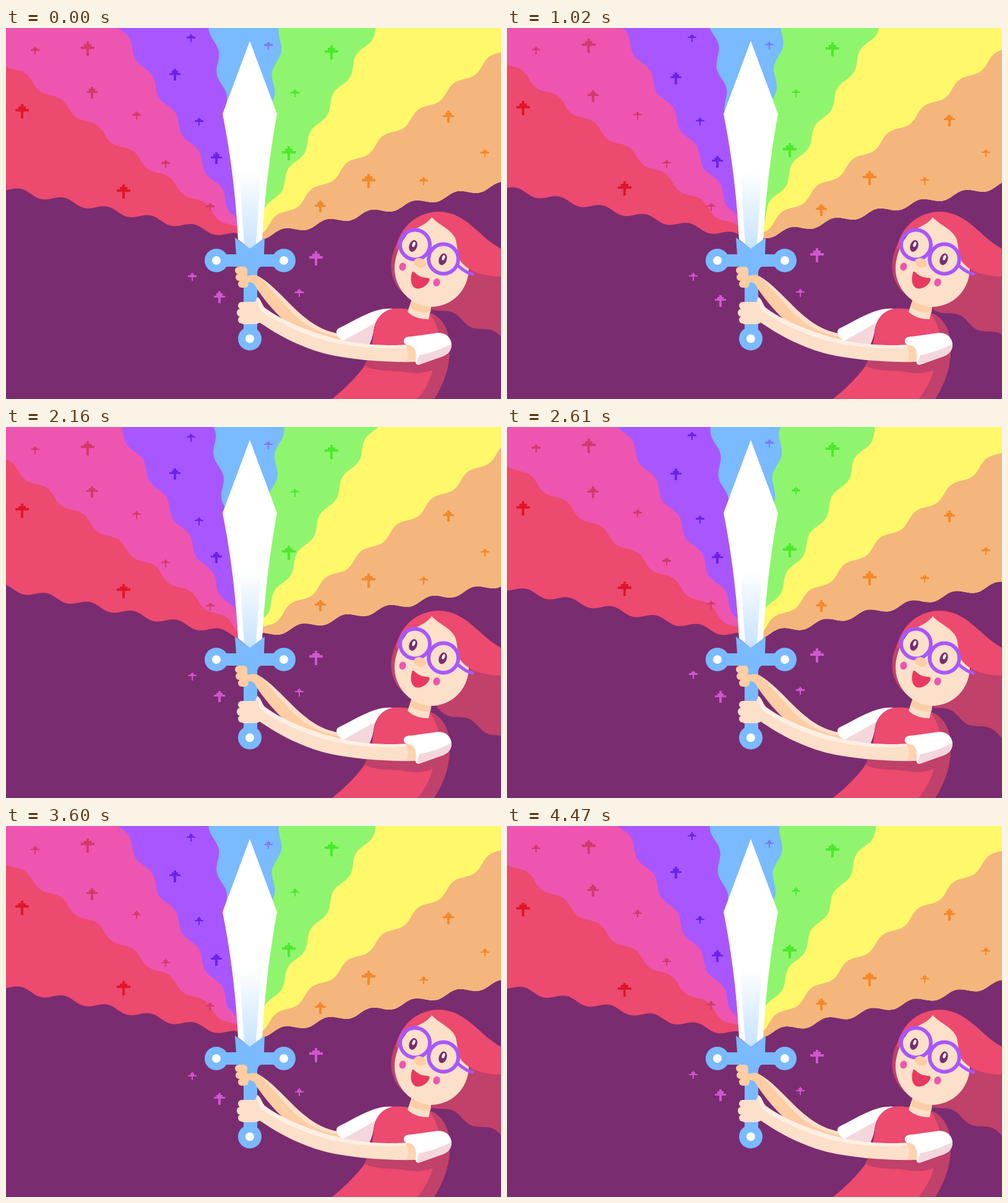
These frames come from a looping animation (800 px wide and 600 px high, 4.5 s). An HTML page:

```html
<!DOCTYPE html>
<html lang="en">
<head>
<meta charset="utf-8">
<title>Rainbow sword</title>
<style>
  html, body { margin: 0; width: 100%; height: 100%; overflow: hidden; background: #7a2c70; }
  svg { display: block; width: 800px; height: 600px; }
</style>
</head>
<body>
<svg viewBox="0 0 800 600" xmlns="http://www.w3.org/2000/svg">
  <defs>
    <linearGradient id="shine" x1="0" y1="232" x2="0" y2="356" gradientUnits="userSpaceOnUse">
      <stop offset="0" stop-color="#fff"/>
      <stop offset="1" stop-color="#c6e3ff"/>
    </linearGradient>
  </defs>
  <rect width="800" height="600" fill="#7a2c70"/>
  <g id="rays"></g>
  <g id="stars" shape-rendering="crispEdges"></g>

  <!-- hair behind -->
  <path id="tail" fill="#c0416a"/>
  <path d="M640 338C624 354 618 385 626 405C630 418 640 428 646 432L660 380Z" fill="#c0416a"/>

  <!-- dress -->
  <path d="M622 454C606 456 597 470 594 494C592 512 588 530 579 547C567 564 548 583 527 600H692C708 574 717 548 717 520C718 490 706 470 688 462C665 456 642 452 622 454Z" fill="#ec4a6e"/>
  <path d="M685 462C709 470 718 492 717 524C716 552 707 576 692 600H665C677 586 685 570 690 553C674 559 662 559 648 557C626 552 602 558 579 546L586 532L660 536L702 505C699 488 694 474 685 462Z" fill="#c0416a"/>

  <!-- neck and face -->
  <path d="M656 438L649 459C658 468 671 471 683 471L688 448Z" fill="#fce0c9"/>
  <path d="M656 438L653 452C664 459 675 461 686 460L688 446Z" fill="#fdcda4"/>
  <path d="M688 304C656 318 632 346 628 384C626 420 653 449 686 451C721 451 747 424 748 390C748 342 722 306 688 304Z" fill="#fce0c9"/>
  <path d="M630 356C638 318 668 297 700 297C731 298 750 317 771 336C781 345 791 352 800 357V402C772 402 746 394 734 376C729 367 730 350 726 340C719 325 700 319 688 306C678 321 652 326 642 338C638 344 636 350 633 358Z" fill="#ec4a6e"/>

  <ellipse cx="658" cy="352.500" rx="6.3" ry="9.700" transform="rotate(20 658 352.500)" fill="#7a2c70"/>
  <ellipse cx="659" cy="350" rx="2.3" ry="4.3" transform="rotate(20 659 350)" fill="#fff"/>
  <ellipse cx="706" cy="374" rx="6.3" ry="9.700" transform="rotate(20 706 374)" fill="#7a2c70"/>
  <ellipse cx="707" cy="371.500" rx="2.3" ry="4.3" transform="rotate(20 707 371.500)" fill="#fff"/>
  <g fill="none" stroke="#a857fe" stroke-width="6">
    <path d="M730 384C738 391 746 397 754 398" stroke-linecap="round" stroke-width="5"/>
    <circle cx="661" cy="350.500" r="24"/>
    <circle cx="707" cy="373.500" r="24"/>
  </g>
  <ellipse cx="669" cy="380" rx="10" ry="7.500" transform="rotate(22 669 380)" fill="#fdcda4"/>
  <ellipse cx="641" cy="386" rx="5.500" ry="6.500" transform="rotate(20 641 386)" fill="#ed55b0"/>
  <ellipse cx="696" cy="411.500" rx="5.500" ry="6.500" transform="rotate(20 696 411.500)" fill="#ed55b0"/>
  <path d="M656 396C656 394 658 393 660 395C667 402 674 404 682 404C685 405 685 407 684 409C680 418 670 423 662 421C654 417 653 406 656 396Z" fill="#e8395f"/>

  <!-- sword -->
  <path d="M394 21L438 139C428 194 418 265 414 345L394 357L375 342C371 262 361 194 350 139Z" fill="#fff"/>
  <path d="M377 232H412L404 350L394 357L385 350Z" fill="url(#shine)"/>
  <g fill="#7abaff">
    <path d="M370 339L394 357L418 339L417 366H449V386H412Q406 388 406 398V492H384V398Q384 389 376 386H340V366H372Z"/>
    <circle cx="340" cy="376" r="19"/>
    <circle cx="449" cy="376" r="19"/>
    <circle cx="394" cy="502.500" r="19"/>
  </g>
  <g fill="#fff">
    <circle cx="340" cy="376" r="7"/>
    <circle cx="449" cy="376" r="7"/>
    <circle cx="394" cy="502.500" r="7"/>
  </g>

  <!-- far arm -->
  <path d="M388 402C396 399 402 399 407 401C436 418 455 446 484 469C502 484 522 493 546 496L551 508C514 507 481 498 455 478C434 460 418 440 405 421C401 412 396 410 390 412Z" fill="#fdcda4"/>
  <path d="M407 401C436 418 455 446 484 469C502 484 522 493 546 496L545 500C518 497 497 489 478 474C450 452 432 423 407 401Z" fill="#fce0c9"/>
  <g fill="#fdcda4">
    <rect x="370" y="386" width="20" height="12" rx="6"/>
    <rect x="371" y="397" width="20" height="12" rx="6"/>
    <rect x="375" y="408" width="17" height="12" rx="6"/>
    <path d="M378 386H386Q390 388 390 400L391 416L380 418Z"/>
  </g>
  <path d="M625 454C596 451 566 472 537 486C530 491 536 504 550 508L586 514C591 505 593 497 594 489C597 472 606 458 625 454Z" fill="#fff"/>
  <path d="M596 477C580 487 562 496 545 506L550 508L586 514C591 505 593 497 594 489Z" fill="#f3d7dc"/>

  <!-- near arm -->
  <path d="M406 435C413 439 413 449 420 454C452 477 500 495 548 506C588 514 625 514 652 512L668 524L664 540C612 541 560 537 517 527C475 516 440 497 408 475L396 460Z" fill="#fce0c9"/>
  <path d="M406 435C413 439 413 449 420 454C452 477 500 495 548 506C588 514 625 514 652 512L654 516C610 520 572 517 536 510C488 500 446 480 414 459C408 454 408 446 406 435Z" fill="#ffefe4"/>
  <path d="M645 512H662L668 526L664 540H647C651 530 650 521 645 512Z" fill="#fdd3b0"/>
  <g fill="#fce0c9">
    <path d="M380 443H402Q408 443 410 454L411 476Q407 479 400 479H382Z"/>
    <rect x="375" y="443" width="24" height="12" rx="6"/>
    <rect x="373" y="454" width="24" height="13" rx="6"/>
    <rect x="375" y="466" width="24" height="12" rx="6"/>
  </g>
  <path d="M643 508C642 501 648 499 655 499L698 493C713 492 721 504 720 514C719 525 711 530 700 533L669 544C664 546 661 543 662 538C664 525 661 517 655 514C650 512 644 513 643 508Z" fill="#fff"/>
  <path d="M720 511C720 524 712 529 700 533L669 544C665 545 664 542 665 538L668 529C686 526 704 519 720 511Z" fill="#f3d7dc"/>
</svg>

<script>
const NS = "http://www.w3.org/2000/svg";
const TAU = Math.PI * 2;
const LOOP = 4500, STEP = 30;
const WAVE_MS = 900, BOB_MS = 2250;
const LENGTH = 71.5, AMP = 4.9;

const angles = [168.4, 144.2, 121.7, 100.3, 81.35, 59.15, 36.7, 12.1];
const colors = ["#ec4a6e", "#ed55b0", "#a857fe", "#7abaff", "#8ff56f", "#fff86a", "#f4b67c"];

// unit size, bob height, time of lowest point, rest offset from the listed y
const kinds = {
  big: { unit: 3.8, amp: 3.2, low: 0.87, dy: -2.2 },
  mid: { unit: 3.1, amp: 3, low: 0.52, dy: 3 },
  small: { unit: 2.2, amp: 2.7, low: 0.73, dy: 0.5 }
};
const red = "#e0162b", rose = "#d23a6c", violet = "#6c22ea", lime = "#4cea2b";
const amber = "#f4882a", orchid = "#cf56cf";
const stars = [
  ["big", 132, 33, rose], ["big", 26, 134, red], ["big", 190, 264, red],
  ["big", 526, 39, lime], ["big", 457, 202, lime], ["big", 586, 247, amber],
  ["big", 501, 372, orchid],
  ["mid", 139, 104, rose], ["mid", 273, 75, violet], ["mid", 340, 210, violet],
  ["mid", 715, 143, amber], ["mid", 508, 288, amber], ["mid", 345, 435, orchid],
  ["small", 47, 36, rose], ["small", 211, 141, rose], ["small", 258, 219, rose],
  ["small", 330, 289, rose], ["small", 299, 16, violet], ["small", 312, 151, violet],
  ["small", 424, 28, "#7d78fb"], ["small", 467, 105, lime], ["small", 675, 247, amber],
  ["small", 774, 202, amber], ["small", 301, 402, orchid], ["small", 474, 428, orchid]
];

function add(parent, fill) {
  const el = document.createElementNS(NS, "path");
  el.setAttribute("fill", fill);
  document.getElementById(parent).appendChild(el);
  return el;
}

function starPath(u) {
  return [1, 3, 6, 1, 1, 1].map((w, i) =>
    `M${-w * u / 2} ${(i - 2.8) * u}h${w * u}v${u}h${-w * u}z`).join("");
}

// wavy line from (x, y) whose ripples travel outward
function ripple(x, y, deg, reach, phase) {
  const a = deg * TAU / 360, dx = Math.cos(a), dy = -Math.sin(a), pts = [];
  for (let s = 0; s <= reach; s += 4) {
    const o = AMP * Math.cos(TAU * (phase - s / LENGTH));
    pts.push((x + dx * s - dy * o).toFixed(2) + " " + (y + dy * s + dx * o).toFixed(2));
  }
  return pts;
}

const rays = colors.map(c => add("rays", c));
const marks = stars.map(([kind, x, y, fill]) => {
  const el = add("stars", fill), k = kinds[kind];
  el.setAttribute("d", starPath(k.unit));
  return { el, k, x, y: y + k.dy };
});
const tail = document.getElementById("tail");

function draw(t) {
  const wave = t / WAVE_MS, bob = t / BOB_MS;
  const lines = angles.map(a => ripple(394, 341, a, 800, wave + 0.3));
  // each band runs under the next one so no seam shows
  rays.forEach((el, i) => {
    const end = lines[Math.min(i + 2, 7)];
    el.setAttribute("d", "M" + lines[i].concat(end.slice().reverse()).join("L") + "Z");
  });
  const edge = ripple(690, 450.8, -24.4, 150, wave + 0.97);
  tail.setAttribute("d", "M690 400L" + edge.join("L") + "L830 380Z");
  for (const { el, k, x, y } of marks) {
    const top = y + k.amp * Math.cos(TAU * (bob - k.low));
    el.setAttribute("transform", `translate(${x} ${top.toFixed(2)})`);
  }
}

function tick() {
  const t = performance.now() % LOOP;
  draw(Math.floor(t / STEP) * STEP);
  requestAnimationFrame(tick);
}
tick();
</script>
</body>
</html>
```
